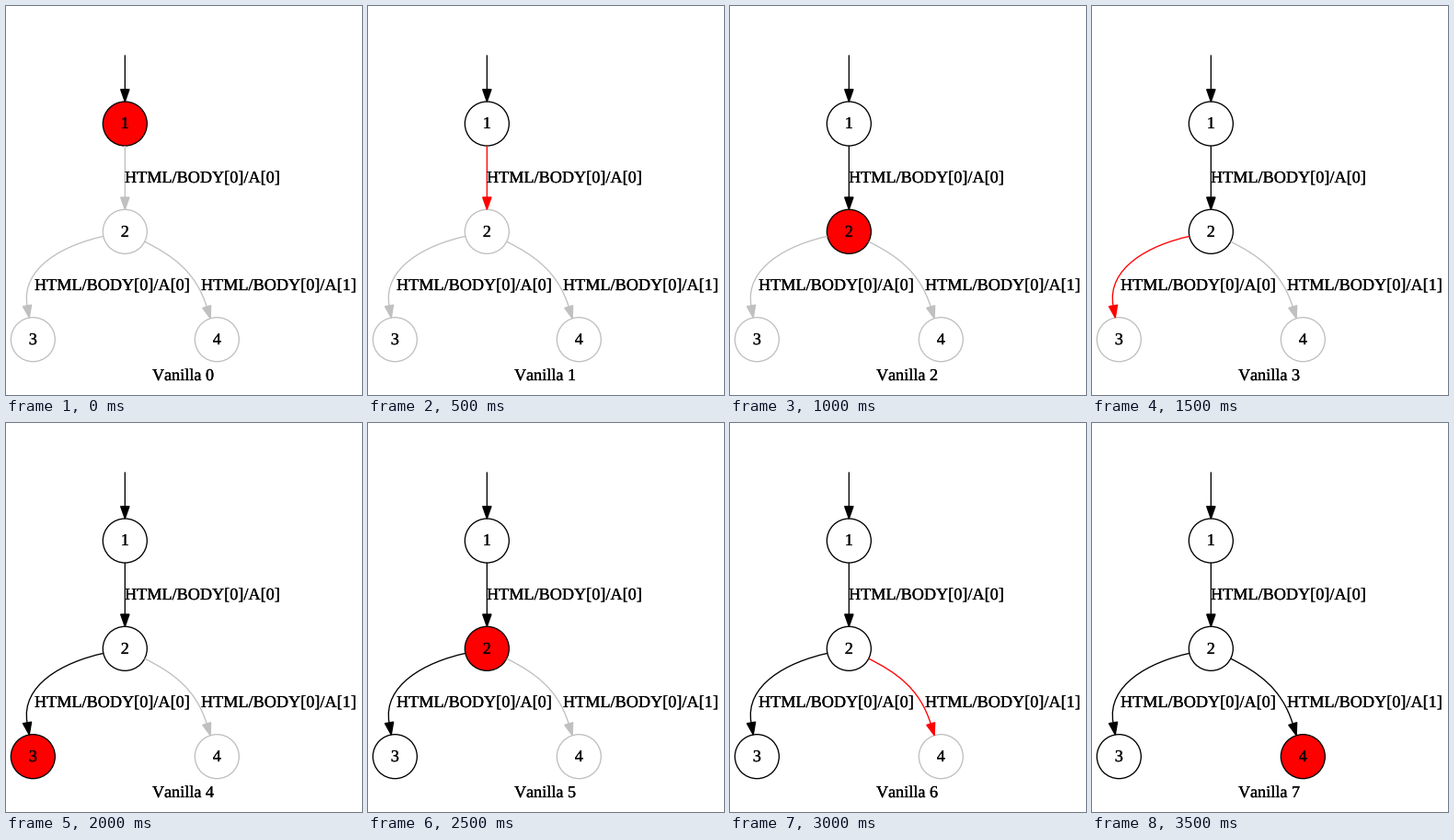
A matplotlib script for the animation above (4 s loop, 387 px wide and 423 px high).

```python
import matplotlib.pyplot as plt
import numpy as np
from matplotlib.animation import FuncAnimation
from matplotlib.patches import Circle, PathPatch, Polygon
from matplotlib.path import Path
from matplotlib.patheffects import withStroke

W, H = 387, 423
RADIUS = 24
LINE = 4 / 3
HEAD = 40 / 3            # arrowhead length
MID, SIDE = 388 / 3, 100
TOP, ROW = 128, 352 / 3  # first row and row spacing
GRAY = "#c0c0c0"

plt.rcParams["text.hinting"] = "none"

# At 72 dpi one point is one pixel.
fig = plt.figure(figsize=(W / 72, H / 72), dpi=72, facecolor="white")
ax = fig.add_axes([0, 0, 1, 1])
ax.set_xlim(0, W)
ax.set_ylim(H, 0)
ax.axis("off")


def write(x, y, text, ha="left"):
    """Text whose capitals are centred on y, on a whole-pixel baseline."""
    return ax.text(x, round(y + 5.4), text, family="Liberation Serif",
                   size=18.2, color="black", ha=ha, va="baseline", zorder=4,
                   path_effects=[withStroke(linewidth=0.25,
                                            foreground="black")])


def add_node(name, center):
    circle = Circle(center, RADIUS, lw=LINE, fc="white", ec=GRAY,
                    zorder=1, snap=False)
    ax.add_patch(circle)
    write(*center, name, ha="center")
    return circle


def toward(start, goal, distance):
    step = np.subtract(goal, start)
    return start + step * distance / np.hypot(*step)


def add_edge(start, end, bends=None):
    """Curve between two node rims, steered by two bends, with an arrowhead."""
    out, into = bends or (end, start)
    first = toward(start, out, RADIUS)
    tip = toward(end, into, RADIUS)
    base = toward(end, into, RADIUS + HEAD)
    if bends:
        path = Path([first, out, into, base], [Path.MOVETO] + [Path.CURVE4] * 3)
    else:
        path = Path([first, base])
    line = PathPatch(path, fc="none", lw=LINE, capstyle="butt",
                     zorder=2, snap=False)
    dx, dy = tip - base
    half = 0.35 * np.array([-dy, dx])
    head = Polygon([base + half, tip, base - half], lw=LINE,
                   joinstyle="miter", zorder=2, snap=False)
    ax.add_patch(line)
    ax.add_patch(head)
    return line, head


def paint_edge(edge, color):
    line, head = edge
    line.set_edgecolor(color)
    head.set_color(color)


centers = {
    "1": (MID, TOP),
    "2": (MID, TOP + ROW),
    "3": (MID - SIDE, TOP + 2 * ROW),
    "4": (MID + SIDE, TOP + 2 * ROW),
}
bends = {
    "2-3": ((62, 260), (16, 285)),
    "2-4": ((180, 271), (206, 288)),
}

nodes = {name: add_node(name, center) for name, center in centers.items()}
edges = {}
for name in ("1-2", "2-3", "2-4"):
    start, end = name.split("-")
    edges[name] = add_edge(centers[start], centers[end], bends.get(name))

entry = add_edge((MID, TOP - RADIUS - 74.6), centers["1"])
paint_edge(entry, "black")

write(129, TOP + 0.5 * ROW, "HTML/BODY[0]/A[0]")
write(31, TOP + 1.5 * ROW, "HTML/BODY[0]/A[0]")
write(212, TOP + 1.5 * ROW, "HTML/BODY[0]/A[1]")

# The capital stands apart so that it is not kerned.
write(159, 401.6, "V")
caption = write(172, 401.6, "")

# The walk through the graph, one node or edge per step.
WALK = ["1", "1-2", "2", "2-3", "3", "2", "2-4", "4"]


def update(step):
    active, seen = WALK[step], WALK[:step + 1]
    for name, circle in nodes.items():
        circle.set_edgecolor("black" if name in seen else GRAY)
        circle.set_facecolor("red" if name == active else "white")
    for name, edge in edges.items():
        color = "black" if name in seen else GRAY
        paint_edge(edge, "red" if name == active else color)
    caption.set_text(f"anilla {step}")
    return []


anim = FuncAnimation(fig, update, frames=len(WALK), interval=500,
                     repeat=True, repeat_delay=0, blit=False)
plt.show()
```
